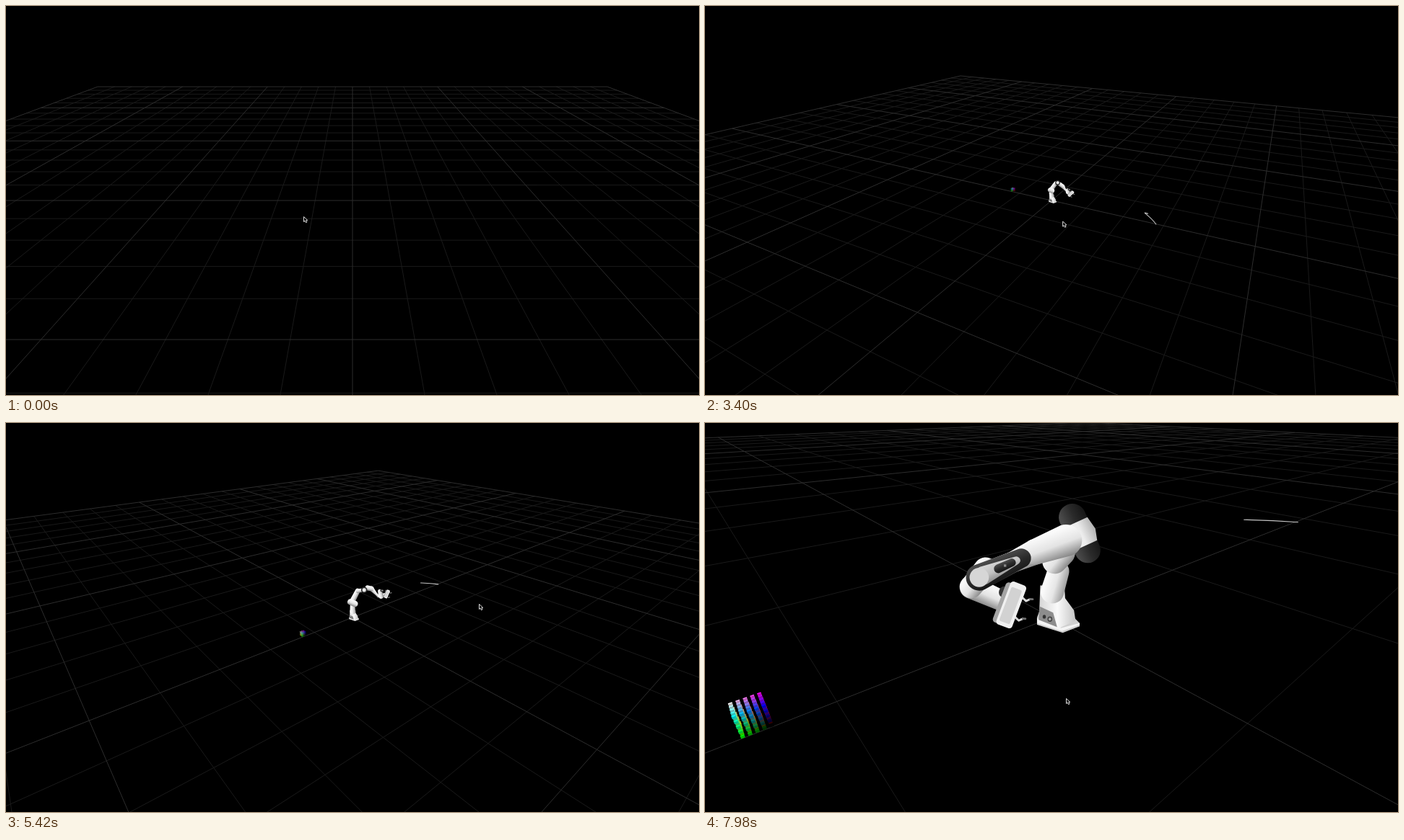
These frames come from a looping animation (960 by 540 pixels, 8 s). An HTML page with a canvas:

```html
<!DOCTYPE html>
<html lang="en">
<head>
<meta charset="utf-8">
<title>Robot arm viewer</title>
<style>
html, body { margin: 0; width: 100%; height: 100%; overflow: hidden; background: #000; }
canvas { display: block; width: 960px; height: 540px; }
</style>
</head>
<body>
<canvas id="stage" width="960" height="540"></canvas>
<script>
const ctx = document.getElementById('stage').getContext('2d');
const LOOP = 8000, FOCAL = 579, CX = 480, CY = 270, FAR = 11.18;
const lerp = (a, b, u) => a + (b - a) * u;
const mix = (a, b, u) => [lerp(a[0], b[0], u), lerp(a[1], b[1], u)];
const smooth = u => u * u * (3 - 2 * u);
const clamp = u => Math.min(1, Math.max(0, u));

// keys: [time, ...values]
function tween(keys, t, ease = u => u) {
  if (t <= keys[0][0]) return keys[0].slice(1);
  for (let i = 1; i < keys.length; i++) {
    const a = keys[i - 1], b = keys[i];
    if (t < b[0]) {
      const u = ease((t - a[0]) / (b[0] - a[0]));
      return a.slice(1).map((v, j) => lerp(v, b[j + 1], u));
    }
  }
  return keys[keys.length - 1].slice(1);
}

// ---------- camera ----------
// time, azimuth, elevation in degrees
const ORBIT = [
  [2020, 0, 26.57], [3040, 39.7, 26.1], [3860, 91.6, 25.3],
  [4460, 118.9, 27.6], [4720, 130.4, 27.45]
];
const MID = 5.14, NEAR = 2.056;

function distance(t) {
  const first = 1 - Math.pow(1 - clamp((t - 5380) / 260), 2);
  const second = 1 - Math.exp(-7 * clamp((t - 5840) / 800));
  return FAR * Math.pow(MID / FAR, first) * Math.pow(NEAR / MID, second);
}

function makeCamera(t) {
  const [az, el] = tween(ORBIT, t).map(d => d * Math.PI / 180);
  return { d: distance(t), sa: Math.sin(az), ca: Math.cos(az), se: Math.sin(el), ce: Math.cos(el) };
}

function toView(c, x, y, z) {
  const r = x * c.ca + z * c.sa, g = x * c.sa - z * c.ca;
  return [r, g * c.se + y * c.ce, c.d + g * c.ce - y * c.se];
}
const toScreen = v => [CX + FOCAL * v[0] / v[2], CY - FOCAL * v[1] / v[2]];
const project = (c, x, y, z) => toScreen(toView(c, x, y, z));

// ---------- floor ----------
function floorLine(c, x1, z1, x2, z2) {
  let a = toView(c, x1, 0, z1), b = toView(c, x2, 0, z2);
  const near = 0.05;
  if (a[2] < near && b[2] < near) return;
  const cut = (p, q) => p.map((v, i) => lerp(v, q[i], (near - p[2]) / (q[2] - p[2])));
  if (a[2] < near) a = cut(a, b);
  if (b[2] < near) b = cut(b, a);
  ctx.moveTo(...toScreen(a));
  ctx.lineTo(...toScreen(b));
}

function drawFloor(c) {
  ctx.lineWidth = 1;
  for (const main of [false, true]) {
    ctx.strokeStyle = main ? '#2d2d2d' : '#1a1a1a';
    ctx.beginPath();
    for (let i = -15; i <= 15; i++) {
      if ((i % 5 === 0) !== main) continue;
      floorLine(c, i, -15, i, 15);
      floorLine(c, -15, i, 15, i);
    }
    ctx.stroke();
  }
}

// ---------- colour lattice ----------
function drawLattice(c) {
  const step = 0.02, w = 0.0055, h = 0.004, list = [];
  for (let r = 0; r < 5; r++)
    for (let g = 0; g < 5; g++)
      for (let b = 0; b < 5; b++) {
        const p = [0.01 + r * step, b * step, -1.2 - g * step];
        list.push({ p, depth: toView(c, ...p)[2], rgb: [r, g, b].map(v => v * 63.75) });
      }
  list.sort((m, n) => n.depth - m.depth);
  for (const { p: [x, y, z], rgb } of list) {
    const face = (a, b, light) => {
      ctx.fillStyle = `rgb(${rgb.map(v => Math.round(v * light)).join()})`;
      ctx.beginPath();
      for (const [q, s] of [[a, -w], [a, w], [b, w], [b, -w]])
        ctx.lineTo(...project(c, x + q[0], y + q[1], z + s));
      ctx.fill();
    };
    face([-h, -h], [-h, h], 0.75);
    face([-h, h], [h, h], 1);
  }
}

// ---------- path on the floor ----------
const BEND = [[2000, .45, 2.43], [3860, .46, 2.4], [5140, .335, 2.55]];

function drawTrail(c, t) {
  const [bx, bz] = tween(BEND, t);
  const tz = Math.max(bz, 3.9 - t * 0.00041);
  const tx = bx - 0.115 * clamp((tz - bz) / 0.6);
  const at = (x, z) => project(c, x, 0, z);
  ctx.strokeStyle = '#c4c4c4';
  ctx.lineWidth = 1.1;
  ctx.lineJoin = 'round';
  ctx.beginPath();
  ctx.moveTo(...at(-0.02, 2.83));
  ctx.quadraticCurveTo(...at(bx * 0.45, lerp(2.83, bz, 0.36)), ...at(bx * 0.94, bz + 0.02));
  ctx.quadraticCurveTo(...at(bx, bz), ...at(lerp(bx, tx, .2), lerp(bz, tz, .15)));
  ctx.lineTo(...at(tx, tz));
  ctx.stroke();
}

// ---------- robot ----------
// shoulder 1-2, upper arm, elbow cap 1-2, forearm 1-2, knuckle, wrist 1-2, hand, hand angle, side view
const REACH = [
  -12, -84, 13, -74, 28, -144, 63, -149, 63, -149, 82, -160,
  102, -156, 139, -115, 148, -142, 154, -116, 186, -127, 113, 0
];
const FOLD = [
  4, -70, 13, -81, 27, -99, 26, -125, 45, -84, 18, -96,
  -20, -82, -90, -50, -82, -60, -100, -38, -51, -16, 110.5, 1
];

// builds a full pose from its main joints
function bend(shoulder, upper, elbow, fore, knuckle, hand, deg) {
  const [x, y] = shoulder, grip = mix(knuckle, hand, .2);
  return [
    [x - 7, y - 2], [x + 6, y + 3], upper, elbow, elbow, mix(elbow, fore, .45), fore, knuckle,
    [grip[0] + 3, grip[1] - 9], [grip[0] + 5, grip[1] + 5], hand, deg, 0
  ].flat();
}

const POSES = [
  [400, ...bend([-5, -68], [-36, -110], [-48, -122], [0, -132], [35, -114], [48, -88], 180)],
  [2000, ...bend([-7, -76], [-27, -140], [-12, -160], [66, -172], [93, -164], [93, -128], 168)],
  [3040, ...bend([-4, -61], [22, -112], [32, -119], [58, -78], [68, -54], [90, -26], 150)],
  [3860, ...bend([0, -81], [38, -122], [56, -124], [102, -122], [144, -83], [190, -74], 120)],
  [4500, ...REACH], [6120, ...REACH], [7440, ...FOLD]
];
const WHITE = ['#fbfbfb', '#e3e3e3', '#858585'];
const BLACK = ['#4a4a4a', '#2a2a2a', '#161616'];

function shade(p, n, r, tones) {
  const g = ctx.createLinearGradient(p[0] + n[0] * r, p[1] + n[1] * r, p[0] - n[0] * r, p[1] - n[1] * r);
  tones.forEach((tone, i) => g.addColorStop([0.1, 0.55, 1][i], tone));
  return g;
}

function capsule(a, b, ra, rb, tones = WHITE) {
  const dir = Math.atan2(b[1] - a[1], b[0] - a[0]);
  let n = [-Math.sin(dir), Math.cos(dir)];
  if (n[0] * -0.5 + n[1] * -0.85 < 0) n = n.map(v => -v);
  ctx.fillStyle = shade(a, n, Math.max(ra, rb), tones);
  ctx.beginPath();
  ctx.arc(...a, ra, dir + Math.PI / 2, dir + Math.PI * 1.5);
  ctx.arc(...b, rb, dir - Math.PI / 2, dir + Math.PI / 2);
  ctx.fill();
}

function poly(pts, fill) {
  ctx.fillStyle = fill;
  ctx.beginPath();
  for (let i = 0; i < pts.length; i += 2) ctx.lineTo(pts[i], pts[i + 1]);
  ctx.fill();
}

function disc(p, rx, ry, fill, turn = 0) {
  ctx.fillStyle = fill;
  ctx.beginPath();
  ctx.ellipse(p[0], p[1], rx, ry, turn, 0, 7);
  ctx.fill();
}

function drawBase() {
  poly([-18, 0, -15, -8, 20, -8, 35, 7, 35, 11, 14, 19, -18, 9], '#cfcfcf');
  poly([-18, 1, 12, 13, 35, 7, 35, 9, 13, 17, -18, 7], '#f4f4f4');
  const coat = ctx.createLinearGradient(-15, 0, 30, 0);
  coat.addColorStop(0, '#d6d6d6');
  coat.addColorStop(.5, '#fafafa');
  coat.addColorStop(1, '#c4c4c4');
  poly([-14, -40, 16, -40, 17, -24, 28, -9, 30, 4, 10, 13, -16, 2, -15, -12], coat);
  poly([-15, -14, 2, -6, 7, 12, -16, 3], '#8d8d8d');
  disc([-9, -1], 2, 2.4, '#333');
  disc([-2, 2], 3, 3.3, '#444');
  disc([-2, 2], 1.6, 1.8, '#aaa');
}

function drawElbow(c1, c2, side) {
  if (side < 0.15) {
    disc(c1, 16.5, 16.5, '#272727');
    disc(c1, 12, 12, '#555');
    disc(c1, 9.5, 10, '#eee');
    return;
  }
  capsule(c1, c2, 17, 16, BLACK);
  const a = mix(c1, c2, .17), b = mix(c1, c2, .86), m = mix(a, b, .55);
  const l = Math.hypot(c2[0] - c1[0], c2[1] - c1[1]) || 1;
  const n = [(c2[1] - c1[1]) / l, (c1[0] - c2[0]) / l];
  const off = (p, d) => [p[0] + n[0] * d, p[1] + n[1] * d];
  poly([off(a, 17), off(m, 20), off(b, 16), off(b, -17), off(a, -17)].flat(),
    shade(m, n, -20, ['#f6f6f6', '#ececec', '#b0b0b0']));
}

function drawForearm(f1, f2, k, side) {
  const neck = mix(f2, k, lerp(.75, .4, side));
  const thin = lerp(6, 13, side), thick = lerp(13, 16, side);
  capsule(neck, k, thin, lerp(7, 16, side));
  capsule(f2, neck, thick, thin);
  capsule(f1, f2, lerp(14, 20, side), thick);
}

// dark cover with a pale inlay, seen only from the side
function drawCover(f2, k, side) {
  const at = u => mix(f2, k, u);
  ctx.globalAlpha = side;
  capsule(at(.25), k, 12, 16.5, BLACK);
  capsule(at(.34), at(.92), 5, 11.5, ['#d4d4d4', '#c2c2c2', '#8e8e8e']);
  capsule(at(.42), at(.66), 5, 5.5, BLACK);
  disc(k, 12, 12, '#d6d6d6');
  ctx.fillStyle = '#8a8a8a';
  ctx.fillRect(at(.54)[0] - 1.5, at(.54)[1] - 1.5, 3, 3);
  ctx.globalAlpha = 1;
}

function drawHand(h, deg, side) {
  const len = lerp(47, 57, side) / 2, w = lerp(19, 23, side) / 2;
  const box = (x, y, bw, bh, r, fill) => {
    ctx.fillStyle = fill;
    ctx.beginPath();
    ctx.roundRect(x, y, bw, bh, r);
    ctx.fill();
  };
  ctx.save();
  ctx.translate(...h);
  ctx.rotate(deg * Math.PI / 180);
  disc([-12, w + 2], 7, 6, '#353535');
  ctx.lineWidth = 2.6;
  ctx.lineCap = ctx.lineJoin = 'round';
  for (const x of [-14, 12]) {
    ctx.strokeStyle = '#d8d8d8';
    ctx.beginPath();
    ctx.moveTo(x, -w + 2);
    ctx.lineTo(x + 3, -w - 5);
    ctx.lineTo(x - 1, -w - 9);
    ctx.stroke();
    ctx.strokeStyle = '#6d6d6d';
    ctx.beginPath();
    ctx.moveTo(x - 1, -w - 9);
    ctx.lineTo(x - 2, -w - 12);
    ctx.stroke();
  }
  box(-len + 3, -w + 3, len * 2 - 4, w * 2, 4, '#a5a5a5');
  box(-len, -w, len * 2, w * 2 - 2, 4, '#f0f0f0');
  box(-len + 7, -w + 4, len * 2 - 12, w * 2 - 9, 2, '#d2d2d2');
  ctx.restore();
}

function drawRobot(c, t) {
  const v = tween(POSES, t, smooth);
  const [s1, s2, u, c1, c2, f1, f2, k, w1, w2, h] = Array.from({ length: 11 }, (_, i) => v.slice(2 * i, 2 * i + 2));
  const [deg, side] = v.slice(22);
  const waist = mix(s1, s2, .5);
  waist[1] += 18;
  ctx.save();
  ctx.translate(CX, CY);
  ctx.scale(2.29 / c.d, 2.29 / c.d);
  drawBase();
  capsule([1, -32], waist, 14.5, 13.5, ['#fafafa', '#e6e6e6', '#9c9c9c']);
  capsule(mix(s1, s2, .3), u, 15, 13.5);
  capsule(s1, s2, 15.5, 16.5);
  capsule(u, mix(u, c1, .6), 11, 10);
  if (side >= .15) drawElbow(c1, c2, side);
  drawForearm(f1, f2, k, side);
  if (side < .15) drawElbow(c1, c2, side);
  capsule(w2, mix(w2, h, .72), lerp(12, 14.5, side), lerp(9, 13, side));
  capsule(w1, w2, lerp(11, 15, side), 14);
  if (side < .5) {
    disc([w1[0] + 11, w1[1] - 3], 10, 6.5, '#2b2b2b', .1);
    disc([w1[0] + 12, w1[1] - 4], 6, 3, '#999', .1);
  }
  drawCover(f2, k, side);
  drawHand(h, deg, side);
  ctx.restore();
}

// ---------- pointer ----------
const POINTER = [
  [1220, 412, 292], [1800, 400, 296], [2000, 403, 296], [3040, 457.5, 299], [3860, 543, 298],
  [4460, 593, 302], [5020, 593, 302], [5140, 655, 251], [7480, 655, 251], [7960, 500, 382]
];

function drawPointer(t) {
  const [x, y] = tween(POINTER, t);
  ctx.save();
  ctx.translate(x + .5, y + .5);
  poly([0, 0, 0, 7, 1.7, 5.6, 2.9, 8.2, 4.4, 7.5, 3.3, 5, 5.2, 4.8], '#000');
  ctx.closePath();
  ctx.strokeStyle = '#dcdcdc';
  ctx.lineWidth = 1;
  ctx.lineJoin = 'miter';
  ctx.stroke();
  ctx.restore();
}

// ---------- loop ----------
const start = performance.now();
function frame() {
  const t = (performance.now() - start) % LOOP;
  const cam = makeCamera(t);
  ctx.fillStyle = '#000';
  ctx.fillRect(0, 0, 960, 540);
  drawFloor(cam);
  if (t >= 140) {
    drawLattice(cam);
    drawTrail(cam, t);
  }
  if (t >= 400) drawRobot(cam, t);
  drawPointer(t);
  requestAnimationFrame(frame);
}
frame();
</script>
</body>
</html>
```
